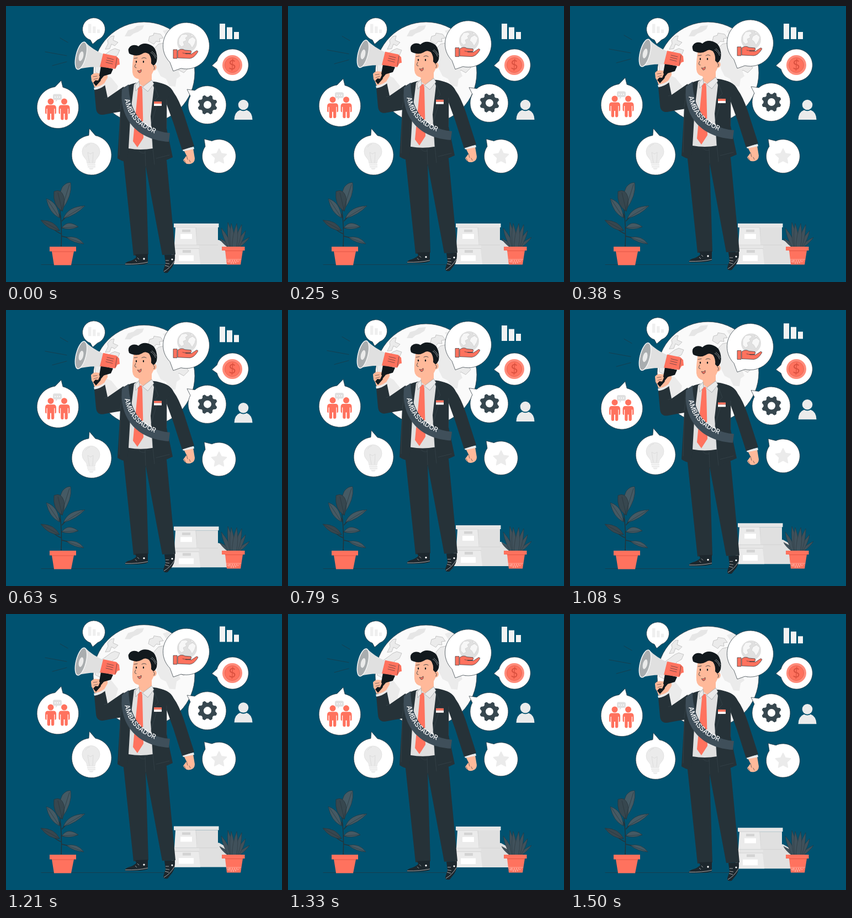
These frames come from a looping animation (500x500 px, 1540 ms). An HTML page:

```html
<!DOCTYPE html>
<html lang="en">
<head>
<meta charset="utf-8">
<title>Ambassador</title>
<style>
  html, body { margin: 0; width: 100%; height: 100%; overflow: hidden; background: #005270; }
  svg { display: block; width: 100vw; height: 100vh; }
  .white { fill: #fff; }
  .pale { fill: #ebebeb; }
  .grey { fill: #e0e0e0; }
  .red { fill: #ff725e; }
  .dark { fill: #263238; }
  .slate { fill: #37474f; }
  .leaf { fill: #455a64; }
  .skin { fill: #ffb99a; }
  .hair { fill: #12191d; }
  .shoe { fill: #1d272d; }
  .ink, .thin, .seam, .coast { fill: none; stroke: #263238; stroke-linecap: round; stroke-linejoin: round; }
  .ink { stroke-width: .8; }
  .thin { stroke-width: .6; }
  .seam { stroke: #3b4950; stroke-width: .6; }
  .coast { fill: #ebebeb; stroke: #a6a6a6; stroke-width: .6; }
  .edged { stroke: #263238; stroke-width: .7; stroke-linejoin: round; }
  .sash { font: 500 12px Inter, "Open Sans", sans-serif; fill: #fff; letter-spacing: .15px; }
  .coin { font: 23px Lato, Inter, sans-serif; fill: #d9503f; text-anchor: middle; }
</style>
</head>
<body>
<svg viewBox="0 0 500 500">
  <defs>
    <path id="sashLine" d="M215 169C221 203 241 223 290 238"/>
    <clipPath id="earth"><circle cx="250" cy="121" r="91.600"/></clipPath>
    <g id="worker">
      <circle cx="81" cy="173" r="5.500"/>
      <path d="M75 179.500H87Q91 180 91 185V193Q91 196 88.500 195.500V186H87.300V204Q87 206.500 84.500 206.500Q82 206.500 82 204V195H80V204Q80 206.500 77.500 206.500Q75 206.500 74.700 204V186H73.500V195.500Q71 196 71 193V185Q71 180 75 179.500Z"/>
    </g>
  </defs>

  <g id="late">
    <circle class="edged" cx="250" cy="121" r="92" fill="#fafafa"/>
    <g clip-path="url(#earth)">
      <path fill="#e6e6e6" d="M215 55L221 44L231 41L237 36L250 35L247 42L239 47L231 50L225 55Z"/>
      <path class="coast" d="M180 78L185 68L184 62L190 55L196 54L194 62L203 66L197 72L191 69L188 77Z"/>
      <path class="coast" d="M162 104L171 94L182 86L190 80L197 77L206 80L202 89L193 94L190 104L180 110L170 124L162 120Z"/>
      <path class="coast" d="M258 63L260 55L267 53L268 49L280 51L285 58L278 59L279 65L272 64L268 69Z"/>
      <path class="coast" d="M268 78L276 69L286 67L296 74L310 80L322 99L331 112L322 121L313 116L306 125L296 117L290 111L281 105L272 94Z"/>
      <path class="pale" d="M272 98L282 92L296 94L309 110L316 127L309 132L307 146L296 145L290 132L280 127L273 113Z"/>
      <path class="pale" d="M284 45L299 40L318 58L306 65L294 60Z"/>
      <path class="pale" d="M176 123L191 130L203 145L198 164L190 181L181 162L174 144Z"/>
    </g>

    <path class="white edged" d="M153 61.600A20.500 20.500 0 1 1 166 61.300L157 69Z"/>
    <path class="pale" opacity=".8" d="M149 32.500h5.500V49h-5.500zM157 37h5.500V49H157zM165 42.500h5V49h-5z"/>

    <path class="white edged" d="M150 234.400L151 222L162 234.700A36 36 0 1 1 150 234.400Z"/>
    <path class="pale" stroke="#ddd" stroke-width=".7" d="M147 285Q147 279 142.500 275A16 16 0 1 1 165.500 275Q161 279 161 285Z"/>
    <path d="M151 284L148 265L153 268L158 265L157 284M144 256Q146 251 152 250" fill="none" stroke="#d8d8d8" stroke-width=".8"/>
    <path class="pale" d="M147 286.500h15v2.600h-15zM148 290h14v2.500h-14zM150 293.300h9l-2 3h-5z"/>

    <path class="white edged" d="M361 254.500L359 241L373 244.500A30.500 30.500 0 1 1 361 254.500Z"/>
    <path id="star" class="pale" stroke="#ebebeb" stroke-width="2" stroke-linejoin="round"/>

    <path fill="#f2f2f2" d="M387 32h10v28h-10zM400 38.500h10V60h-10zM413 47h9v13h-9z"/>
    <circle class="pale" cx="430" cy="179" r="9.300"/>
    <path class="pale" d="M413.500 206Q414 192 424 188.500Q430 192 436 188.500Q446 192 446.500 206Z"/>

    <path class="grey" d="M300 433H345L352 424H386L400 432V468H300Z"/>
    <path class="pale" d="M300 440H349L352 468H300Z"/>
    <path class="grey" d="M307 401H384V433H307Z"/>
    <path class="pale" d="M307 401H343L347 433H305Z"/>
    <path fill="#e6e6e6" d="M304 394H385.500V401H304ZM302 433H350V439H302Z"/>
    <path d="M305 401H343M303 433H384M303 439.500H350M344 401L346 433" fill="none" stroke="#cfcfcf" stroke-width=".7"/>
    <path fill="#d3d3d3" d="M319 405h15v4.500h-15zM320 442h15v5h-15z"/>
    <path class="white" d="M316 413h21v9h-21zM313 451.500h27v10.500h-27z"/>
  </g>

  <path class="thin" d="M64 468.500H300"/>
  <path class="white edged" d="M382.300 99.500L373 108L382.300 114.500A29 29 0 1 0 382.300 99.500Z"/>
  <circle cx="410" cy="107" r="18" fill="#ff8b7a"/>
  <circle class="red" cx="410" cy="107" r="13.500" stroke="#e2604f" stroke-width=".8"/>
  <text class="coin" x="410" y="115">$</text>

  <g stroke="#263238" stroke-width=".6">
    <path d="M100 437Q102 400 97 363M101 413Q92 410 84 402M101 402L115 399M101 417L118 421M99 384L96 376M101 390L113 377" fill="none" stroke-width="1.400"/>
    <path class="leaf" d="M100 371Q92 347 102 328Q109 319 117 320Q121 343 100 371Z"/>
    <path class="slate" d="M102 372Q84 361 87 336Q100 330 105 346Q107 358 102 372Z"/>
    <path class="leaf" d="M97 384Q78 375 73 349Q94 355 97 384Z"/>
    <path class="leaf" d="M104 385Q112 363 143 362Q127 379 104 385Z"/>
    <path class="slate" d="M97 407Q77 407 63 388Q88 388 97 407Z"/>
    <path class="leaf" d="M101 402Q112 386 131 400Q115 407 101 402Z"/>
    <path class="leaf" d="M109 419Q130 415 141 431Q123 430 109 419Z"/>
    <path d="M100 371L115 323M102 372L94 338M97 384L75 351M104 385L140 363M97 407L65 389M101 402L130 400M109 419L139 430" fill="none"/>
  </g>
  <path class="red" d="M79 436H127V444.500H123L118 469.500H87L83 444.500H79Z"/>
  <path d="M83 445H123" stroke="#d9503f" stroke-width=".8"/>

  <g id="spikes" fill="#40515b" stroke="#263238" stroke-width=".5"></g>
  <path class="red" d="M391 436H432.500V443H429L425 468.500H400L397 443H391Z"/>
  <path d="M397 443.500H429" stroke="#d9503f" stroke-width=".8"/>
  <path d="M399 459H426M400 460l2 4 2-4v5l2-5 2 7 2-7 2 7 2-7 2 6 2-6 2 4 3-4" fill="none" stroke="#ffc7bd" stroke-width=".6"/>

  <g id="early">
    <path class="white edged" d="M89 146.400L100 135L103 147.200A37.800 37.800 0 1 1 89 146.400Z"/>
    <path class="grey" d="M87 159.500H98Q101 160 101 162.500V167Q101 170 98 170H93L90 174V170H87Q85 170 85 167V162Q85 160 87 159.500Z"/>
    <path d="M89 165h.1m3.900 0h.1m3.900 0h.1" stroke="#fff" stroke-width="2" stroke-linecap="round"/>
    <use href="#worker" class="red"/>
    <use href="#worker" class="red" x="24.500"/>

    <path class="white edged" d="M297 102A42 42 0 1 1 317 113L303 118Z"/>
    <circle class="grey" cx="328" cy="66" r="18"/>
    <path fill="#f7f7f7" stroke="#c4c4c4" stroke-width=".5" d="M313 60L318 52L326 51L330 54L325 58L327 62L321 65L323 71L318 74L313 69ZM331 60L338 56L344 61L342 68L337 76L333 69L329 66ZM334 51L339 53L337 56Z"/>
    <path class="red edged" d="M311 81Q318 76 324 80L335 81Q337 84 334 86L325 86L336 87L345 81Q349 81 347 84Q341 94 333 95L311 94Z"/>
    <path class="red edged" d="M303 79h7v16h-7z"/>
    <path class="thin" d="M320 85Q327 88 335 86"/>

    <path class="white edged" d="M334 163L328 151L342 153A34.500 34.500 0 1 1 334 163Z"/>
    <path id="gear" class="slate" stroke="#37474f" stroke-linejoin="round"/>
    <circle class="white" cx="365" cy="179" r="7"/>

    <path class="thin" d="M98 58L112 66M71 83L110 90M84 108L110 101"/>

    <path class="dark" d="M219 254H266L291 280L307 450L283 451L253 290L258 450L231 452L213 282Z"/>
    <path class="seam" d="M252 262L253 290M241 262Q244 268 252 266M222 259H266"/>
    <path class="shoe" d="M234 450L257 449L257 466Q246 470 216 469Q214 466 221 463Q232 460 236 455Z"/>
    <path class="shoe" d="M287 451L306 450Q307 464 301 473L293 483Q285 485 285 479L289 466Z"/>
    <path d="M216 467.500Q240 468 257 464M286 481Q297 475 305 462M288 470l7 2M289 466l7 1M289 461l6 0M234 460l3 3M238 456l3 3" fill="none" stroke="#ddd" stroke-width=".7"/>
    <circle class="white" cx="250" cy="458" r="1.700"/><circle class="white" cx="301" cy="459" r="1.600"/>

    <path class="skin" d="M322 261L339 258L342 276Q342 284 334 286Q325 288 321 279L327 271Z"/>
    <path class="thin" d="M327 271L329 278M326 286L323 279M334 283L332 279"/>
    <path class="pale" d="M319 259L340 255L341 259L321 263Z"/>
    <path class="dark" d="M278 140Q297 142 304 157Q313 169 322 195L341 254L319 261L303 211L291 178Z"/>

    <path class="dark" d="M210 150Q218 143 236 139L268 137Q290 140 298 150L291 180L291 222L302 274Q285 282 269 288L264 260L222 260L219 283Q209 281 202 276L207 192Z"/>
    <path class="grey" d="M232 142L241 136L263 135L268 148L262 200L266 258Q244 262 222 258L226 190Z"/>
    <path class="skin" d="M240 126L264 119L264 136L251 148L241 140Z"/>
    <path class="red" d="M238 145H246L247 152L249 239L238 256L230 245L239 152Z"/>
    <path class="pale" stroke="#8b9499" stroke-width=".6" d="M241 136L234 144L235 154L242 146ZM264 134L247 147L257 155L268 141Z"/>
    <path class="seam" d="M268 143L276 164L270 170L275 173L263 214L266 258L269 287M291 170L291 222M272 276L296 270M207 190L205 270"/>
    <path class="red" d="M268 173H282V177H268Z"/>
    <path class="white" d="M268 177H282V181H268Z"/>

    <path class="dark" d="M160 152Q170 150 179 142L184 166L213 146L216 190Q191 194 176 197Q164 198 163 185Z"/>
    <path class="pale" d="M159 148Q169 146 178 139L180 143Q170 151 160 152Z"/>
    <path class="seam" d="M184 166L178 168M207 188Q210 176 209 164"/>
    <path fill="#3f4f5a" d="M210 151L222 142C223 191 246 226 297 230L295 246C242 243 205 209 210 151Z"/>
    <text class="sash"><textPath href="#sashLine">AMBASSADOR</textPath></text>

    <path class="skin" d="M232 84Q228 107 229 120Q230 131 242 133Q256 134 263 126L270 112L267 82Z"/>
    <ellipse class="skin" cx="268" cy="111" rx="4.800" ry="6"/>
    <path class="hair" d="M223 86Q219 76 227 72Q234 69 240 73Q247 66 258 69Q267 72 270 78Q275 88 273 100Q271 106 267 108L263 104Q264 94 259 87Q252 82 246 87Q236 93 223 86Z"/>
    <path d="M262 84Q268 87 271 95M264 82Q270 86 272 92" fill="none" stroke="#dfe3e5" stroke-width=".6"/>
    <path class="ink" d="M232 95L238 94M246 95Q250 92 254 95M235 105Q231 112 236 112M267 109Q271 110 268 115"/>
    <ellipse class="hair" cx="236" cy="101" rx="1.200" ry="2"/><ellipse class="hair" cx="249" cy="101" rx="1.200" ry="2"/>
    <path class="red edged" d="M238 117Q242 119 245 115Q246 121 241 121Z"/>

    <path class="skin" d="M154 127Q157 121 166 122L180 122Q185 124 184 130L178 140Q169 147 160 147Q158 139 155 136Z"/>
    <path class="hair" d="M172 109L194 114L190 123L180 126L163 145L158 139L169 126Z"/>
    <path class="skin" d="M154 126Q159 120 166 122L170 128L167 135L157 134Z"/>
    <path class="skin" d="M172 133L177 127Q183 124 183 130L178 140L170 143Z"/>
    <path class="thin" d="M158 128L165 127M159 133L166 131"/>
    <path class="grey" d="M143 65Q157 79 176 87L171 111Q151 109 129 115Z"/>
    <ellipse cx="136" cy="90" rx="9" ry="25.500" transform="rotate(14 136 90)" fill="#a9adaf" stroke="#f5f5f5" stroke-width="1.500"/>
    <ellipse class="pale" cx="136" cy="91" rx="4" ry="9" transform="rotate(14 136 91)"/>
    <path class="red" d="M176 86L200 91L205 96L206 106L202 107L198 114L170 110Z"/>
    <path class="thin" d="M183 94L195 97M182 98L194 101M181 102L193 105M201 94L198 112"/>
  </g>
</svg>
<script>
  const LOOP = 1540, FRAMES = 37, FPS = 24, HALF = 750, RISE = 10;
  const byId = id => document.getElementById(id);

  // Closed polygon whose corners cycle through the given radii.
  function radial(cx, cy, radii, count, start) {
    return 'M' + Array.from({ length: count }, (_, i) => {
      const a = start + i * 2 * Math.PI / count, r = radii[i % radii.length];
      return [cx + r * Math.cos(a), cy + r * Math.sin(a)].map(v => v.toFixed(2));
    }).join('L') + 'Z';
  }
  byId('star').setAttribute('d', radial(386, 273, [14, 7], 10, -Math.PI / 2));
  byId('gear').setAttribute('d', radial(365, 179, [17.5, 17.5, 14, 14], 32, .3));

  const tips = [[387, 421], [390, 402], [441, 419], [402, 392], [434, 407], [427, 396], [408, 394], [418, 394]];
  byId('spikes').innerHTML = tips.map(([x, y]) => {
    const base = 412 + (x - 412) * .25, mx = (x + base) / 2, my = (y + 436) / 2;
    return `<path d="M${base - 4} 437Q${mx - 6} ${my} ${x} ${y}Q${mx + 6} ${my} ${base + 4} 437Z"/>`;
  }).join('');

  // Linear rise and fall, resting until the delay has passed.
  function float(id, time, delay) {
    const phase = Math.max(0, time - delay) % (2 * HALF);
    const y = -RISE * (1 - Math.abs(phase / HALF - 1));
    byId(id).setAttribute('transform', `translate(0 ${y.toFixed(3)})`);
  }

  const begin = performance.now();
  function draw(now) {
    const part = Math.max(0, now - begin) % LOOP / LOOP;
    const time = Math.floor(part * FRAMES + .04) % FRAMES * 1000 / FPS;
    float('early', time, 0);
    float('late', time, 500);
    requestAnimationFrame(draw);
  }
  draw(begin);
</script>
</body>
</html>
```
